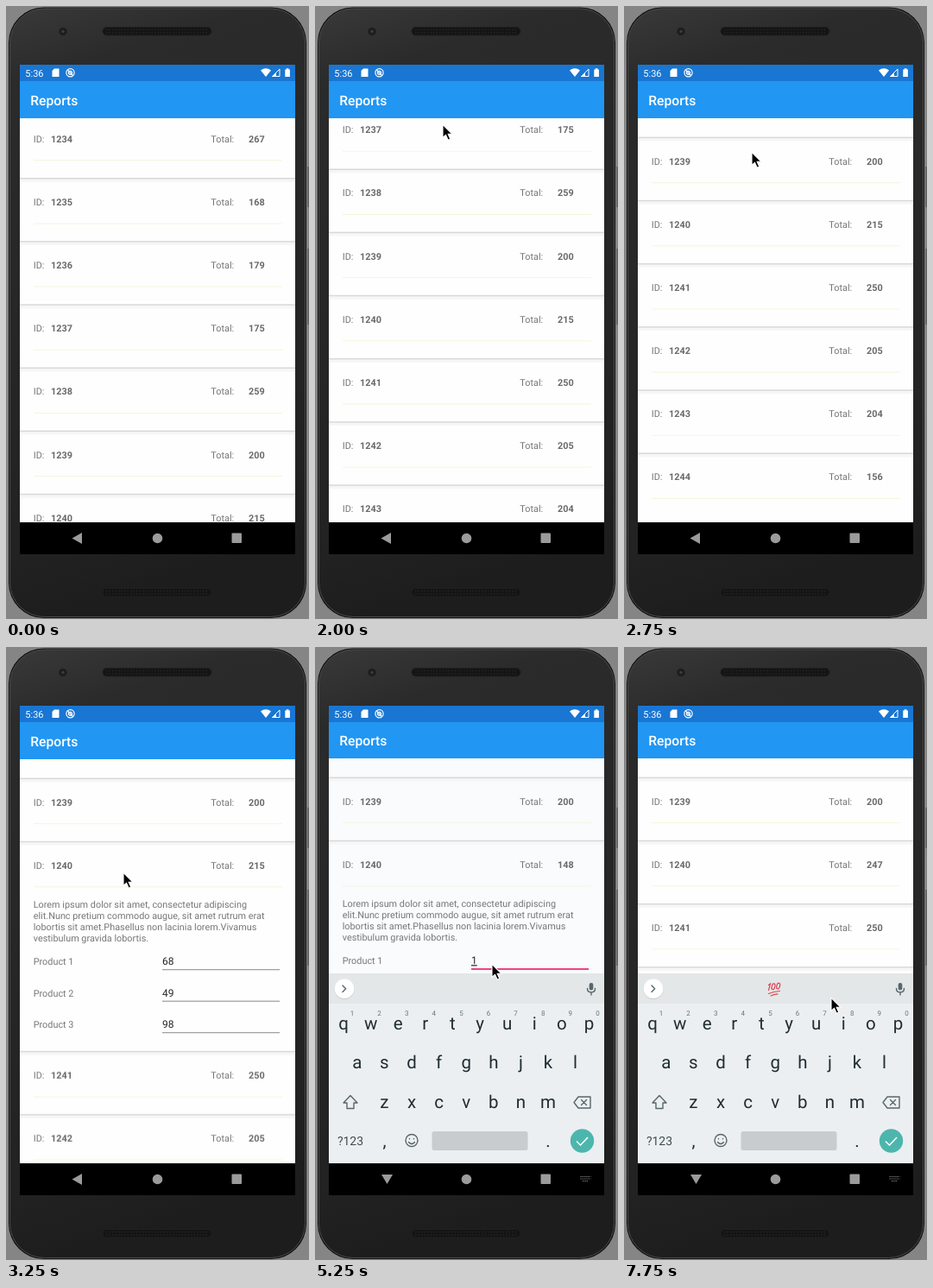
An HTML page for the animation above (8 s loop, 351 by 710 pixels).

```html
<!DOCTYPE html>
<html lang="en">
<head>
<meta charset="utf-8">
<title>Reports</title>
<style>
html, body { margin: 0; width: 100%; height: 100%; overflow: hidden; background: #858585; }
svg { display: block; width: 100vw; height: 100vh; font-family: Roboto, sans-serif; text-rendering: geometricPrecision; }
.list { font-size: 10.87px; fill: #757575; }
.list .bold { font-weight: 700; fill: #6a6a6a; }
.list .value { font-size: 12px; fill: #222; }
.key { font-size: 20.5px; text-anchor: middle; fill: #1f2d33; }
.hint { font-size: 8px; text-anchor: middle; fill: #66747b; }
.icon { fill: none; stroke: #58666d; stroke-width: 1.4; stroke-linejoin: round; stroke-linecap: round; }
</style>
</head>
<body>
<svg viewBox="0 0 351 710" preserveAspectRatio="none">
  <defs>
    <linearGradient id="shell" x2="0.15" y2="1">
      <stop offset="0" stop-color="#393939"/>
      <stop offset=".12" stop-color="#2b2b2b"/>
      <stop offset=".88" stop-color="#222"/>
      <stop offset="1" stop-color="#1d1d1d"/>
    </linearGradient>
    <clipPath id="screen"><rect x="16" y="68" width="319" height="567"/></clipPath>
    <clipPath id="content"><rect x="16" y="87" width="319" height="511"/></clipPath>
  </defs>

  <rect width="351" height="710" fill="#858585"/>
  <path d="M350 186V233M350 281V369" stroke="#5c5c5c" stroke-width="1.500"/>
  <rect x="3" y="1.500" width="345" height="707.500" rx="41" fill="#111"/>
  <rect x="4.500" y="3" width="342" height="704.500" rx="40" fill="url(#shell)" stroke="#4b4b4b"/>
  <circle cx="66" cy="29.500" r="4.500" fill="#1c1c1c" stroke="#262626"/>
  <circle cx="66" cy="29.500" r="1.800" fill="#3c3c40"/>
  <g fill="#141414" stroke="#202020">
    <rect x="112" y="24.500" width="126" height="9.500" rx="4.700"/>
    <rect x="112" y="674.500" width="126" height="9.500" rx="4.700"/>
  </g>
  <path d="M116 27.500H235M116 31H235M116 677.500H235M116 681H235"
    stroke="#242424" stroke-width="1.500" stroke-dasharray="1.500 2"/>

  <g clip-path="url(#screen)">
    <rect id="paper" x="16" y="68" width="319" height="567" fill="#fefefe"/>
    <g clip-path="url(#content)"><g id="list" class="list"></g></g>
    <g id="appbar">
      <rect x="16" y="80" width="319" height="50" fill="#2196f3"/>
      <text x="28.200" y="114.500" font-size="15.700" font-weight="500" fill="#fff">Reports</text>
    </g>

    <rect x="16" y="68" width="319" height="19" fill="#1976d2"/>
    <g fill="#fff">
      <text x="22.300" y="81.600" font-size="11">5:36</text>
      <path d="M56 72.500h5.500v9.500h-8v-7z"/>
      <path d="M295 74.500q6-4.500 12 0l-6 7.500z"/>
      <path d="M323.300 73.500h1.500v-1.200h2.600v1.200h1.500v8.500h-5.600z"/>
      <path d="M308.500 81.500l8.500-8.500v8.500z" fill="none" stroke="#fff"/>
      <path d="M308 82l5-5v5z"/>
    </g>
    <g fill="none" stroke="#fff" stroke-width="1.200">
      <circle cx="74.500" cy="77.300" r="4.600"/>
      <circle cx="74.500" cy="77.300" r="2"/>
      <path d="M71.500 74l6 6.500"/>
    </g>

    <rect x="16" y="598" width="319" height="37" fill="#000"/>
    <g id="keyboard">
      <rect x="16" y="378" width="319" height="220" fill="#eceff1"/>
      <rect x="16" y="378" width="319" height="35" fill="#e3e7e8"/>
      <circle cx="34" cy="396.500" r="11.500" fill="#ccd0d2"/>
      <circle cx="34" cy="395.700" r="11.300" fill="#fff"/>
      <g id="tools" class="icon">
        <path d="M35.500 392l-3.700 3.700 3.700 3.700"/>
        <circle cx="75.500" cy="394" r="4"/><path d="M78.500 397l4.500 4.500" stroke-width="2"/>
        <path d="M118 390.500h10.500v7l-4 4H118zM128.500 397.500h-4v4M121 396q2 2.500 4 0M121 393.500v.1M125.500 393.500v.1"/>
        <text x="160.500" y="400" font-size="11.500" font-weight="700" letter-spacing=".6" fill="#58666d" stroke="none">GIF</text>
        <path d="M211.500 390h7v9h-7zM218.500 392.500h5v9.500h-8l-1-3M220 396h2.500M221 396q0 3-2 4"/>
        <text x="212.200" y="397.500" font-size="8" font-weight="700" fill="#58666d" stroke="none">G</text>
        <path d="M245.500 388v16" stroke="#c9cecf" stroke-width="1"/>
        <path d="M269 396v.1M273.700 396v.1M278.400 396v.1" stroke-width="2.500"/>
      </g>
      <path id="more" class="icon" d="M32 392l3.700 3.700-3.700 3.700"/>
      <g id="hundred" fill="none" stroke="#dd4a54" stroke-width="1.200" stroke-linecap="round">
        <path d="M167.500 391.500l2-1.500-2 7.500M167.500 401.500q6-2.500 13-3M170 404q4-1.800 8-2.200"/>
        <ellipse cx="173" cy="393.300" rx="1.800" ry="3.500" transform="rotate(15 173 393.300)"/>
        <ellipse cx="178.700" cy="392.600" rx="1.800" ry="3.500" transform="rotate(15 178.700 392.600)"/>
      </g>
      <rect x="317.700" y="389" width="4.600" height="8.500" rx="2.300" fill="#58666d"/>
      <path class="icon" d="M315.500 395.500q0 4.500 4.500 4.500t4.500-4.500M320 400v3"/>
      <g id="keys"></g>
      <path class="icon" d="M41 519.500l8 8.500h-4v6.500h-8V528h-4z"/>
      <path class="icon" d="M305 521H319v13h-14l-5-6.500zM308.500 524.500l6 6M314.500 524.500l-6 6"/>
      <text x="41" y="576.700" font-size="14" text-anchor="middle" fill="#3f4c53">?123</text>
      <circle class="icon" cx="112" cy="571.500" r="7"/>
      <path class="icon" d="M108.500 573.500q3.500 4 7 0M109.500 569.500v.2M114.500 569.500v.2"/>
      <rect x="135.500" y="561" width="111" height="22" rx="2.500" fill="#c8cccf"/>
      <circle cx="309.500" cy="572" r="13.700" fill="#4db6ac"/>
      <path d="M303 572.500l4.500 4.500 8.500-9" fill="none" stroke="#fff" stroke-width="1.500"/>
    </g>

    <g fill="#9b9b9b">
      <path id="back" d="M76.500 616.500L88 610v13z"/>
      <path id="hide" d="M77 611h13l-6.500 11z"/>
      <circle cx="175.500" cy="616.500" r="5.800"/>
      <rect x="261.500" y="610.500" width="11.500" height="11.500" rx="1"/>
      <path id="switcher" d="M307.500 613.500h12M307.500 616h12M310 618.500h7" stroke="#8a8a8a" stroke-dasharray="1.300 1"/>
    </g>
    <path id="handle" d="M194 372.700l5.500 4.500a7.700 7.700 0 1 1-11 0z" fill="#ff4081"/>
  </g>

  <path id="pointer" d="M0-.7V14.500L3.500 11.300l2.700 6 2.600-1.100L6.200 10.300H11z" fill="#000" stroke="#fff" stroke-width="1.100"/>
</svg>

<script>
const LOOP = 8000, PITCH = 73.17, GROWTH = 169.8;
const totals = [267, 168, 179, 175, 259, 200, 215, 250, 205, 204, 156];
const OPEN_ROW = 6;
const $ = id => document.getElementById(id);
const text = (x, y, s, attrs = "") => `<text x="${x}" y="${y}" ${attrs}>${s}</text>`;

// Row coordinates are relative to the middle of its heading.
function row(i) {
  const divider = i ? `<rect x="16" y="-26.800" width="319" height="3.500" fill="#f6f6f6"/>
    <rect x="16" y="-28.200" width="319" height="1.500" fill="#d8d8d8"/>` : "";
  const total = i === OPEN_ROW
    ? [215, 148, 157, 247].map((n, k) => text(281, 3.7, n, `class="bold" id="total${k}"`)).join("")
    : text(281, 3.7, totals[i], 'class="bold"');
  return `<g transform="translate(0 ${154 + PITCH * i})">${divider}
    <path d="M32 24.800H320" stroke="#f5f5dc"/>
    ${text(31.7, 3.7, "ID:")}${text(52, 3.7, 1234 + i, 'class="bold"')}
    ${text(237.3, 3.7, "Total:")}${total}${i === OPEN_ROW ? details() : ""}</g>`;
}

function details() {
  const lorem = ["Lorem ipsum dolor sit amet, consectetur adipiscing",
    "elit.Nunc pretium commodo augue, sit amet rutrum erat",
    "lobortis sit amet.Phasellus non lacinia lorem.Vivamus",
    "vestibulum gravida lobortis."].map((s, k) => text(31.7, 49.4 + 12.73 * k, s)).join("");
  const products = [68, 49, 98].map((n, k) => {
    const y = 115.2 + 36.5 * k;
    const values = k ? text(181, y, n, 'class="value"')
      : [68, 1, 10, 100].map((v, j) => text(181, y, v, `class="value" id="entry${j}" ${j ? 'text-decoration="underline"' : ""}`)).join("");
    return text(31.7, y, "Product " + (k + 1)) + values +
      `<path d="M181 ${y + 5.5}H317" stroke="#858585"/>`;
  }).join("");
  return `<g id="details">${lorem}${products}
    <path id="focus" d="M181 121H317" stroke="#ec3f7c" stroke-width="1.800"/>
    <path id="caret" d="M194.700 103V119" stroke="#ff4081" stroke-width="1.500"/></g>`;
}

const rows = totals.map((_, i) => row(i));
$("list").innerHTML = rows.slice(0, OPEN_ROW + 1).join("") +
  `<g id="below">${rows.slice(OPEN_ROW + 1).join("")}</g>`;

const keyRow = (letters, x, y) => [...letters].map((c, i) => text(x + 31.6 * i, y, c, 'class="key"')).join("");
$("keys").innerHTML = keyRow("qwertyuiop", 33, 442.5) + keyRow("asdfghjkl", 48.8, 488) +
  keyRow("zxcvbnm", 80.4, 533.5) + keyRow(",", 80.4, 579) + keyRow(".", 270, 579) +
  [..."1234567890"].map((c, i) => text(43 + 31.6 * i, 427, c, 'class="hint"')).join("");

// Each track holds a style from its time until the next one.
let css = "";
function track(id, steps) {
  const styles = Object.entries(steps);
  const frames = styles.map(([t, s]) => `${t / LOOP * 100}%{${s}}`).join("");
  css += `@keyframes ${id}{${frames}100%{${styles.at(-1)[1]}}}
    #${id}{animation:${id} ${LOOP}ms step-end -4ms infinite}`;
}
const move = (x, y) => `transform:translate(${x}px,${y}px)`;
function show(id, from, to = LOOP) {
  const steps = { 0: `opacity:${from ? 0 : 1}` };
  if (from) steps[from] = "opacity:1";
  if (to < LOOP) steps[to] = "opacity:0";
  track(id, steps);
}

const path = [[0, -50, 0], [250, 94, 436], [500, 97, 390], [750, 108, 290], [1000, 128, 170],
  [1250, 140, 118], [1500, 143, 122], [1750, 146, 130], [2000, 148, 138], [2250, 149, 142],
  [2750, 148, 170], [3000, 140, 235], [3250, 136, 262], [3500, 150, 290], [3750, 190, 345],
  [4000, 204, 366], [4250, 205, 368], [6250, 203, 345], [6500, 199, 310], [6750, 199, 294],
  [7250, 212, 325], [7500, 232, 380], [7750, 240, 407]];
track("pointer", Object.fromEntries(path.map(([t, x, y]) => [t, move(x, y)])));

const scroll = { 0: 0, 1500: 25, 1750: 120, 2000: 230, 2250: 310, 2500: 330, 2750: 340, 4500: 341 };
track("list", Object.fromEntries(Object.entries(scroll).map(([t, y]) => [t, move(0, -y)])));
track("appbar", { 0: move(0, 0), 4500: move(0, -1) });
track("below", { 0: move(0, 0), 3250: move(0, GROWTH), 6750: move(0, 0) });
track("paper", { 0: "fill:#fefefe", 4500: "fill:#fafbfd", 6750: "fill:#fefefe" });
track("keyboard", {
  0: "opacity:0;" + move(0, 9.5),
  4500: "opacity:.86;" + move(0, 9.5),
  4750: "opacity:1;" + move(0, 0)
});

show("details", 3250, 6750);
show("focus", 4250);
show("caret", 4250, 5250);
show("handle", 4500, 5250);
show("back", 0, 4500);
show("hide", 4500);
show("switcher", 4500);
show("tools", 0, 5250);
show("more", 5250);
show("hundred", 5750);
const typed = [0, 5250, 5500, 5750];
typed.forEach((t, k) => {
  show("entry" + k, t, typed[k + 1]);
  show("total" + k, t, typed[k + 1]);
});

document.head.appendChild(document.createElement("style")).textContent = css;
</script>
</body>
</html>
```
